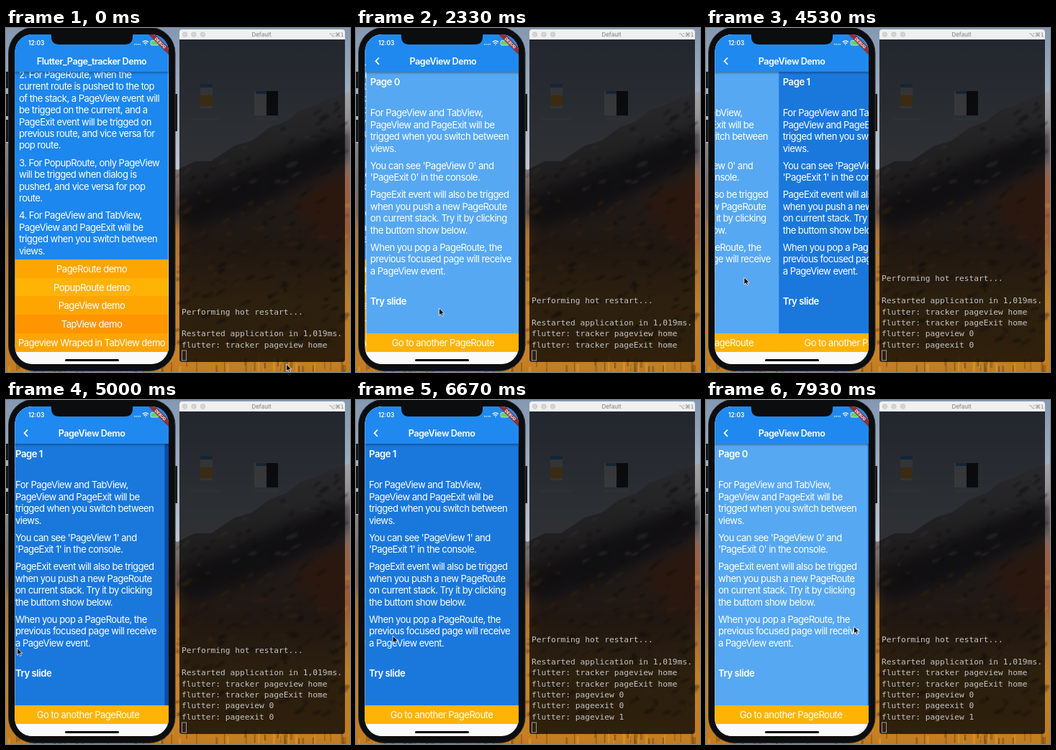
An HTML page for the animation above (8 s loop, 478 by 480 pixels).

```html
<!DOCTYPE html>
<html lang="en">
<head>
<meta charset="utf-8">
<title>Page tracker demo</title>
<style>
html, body { margin: 0; width: 100%; height: 100%; overflow: hidden; background: #000; }
svg { display: block; width: 478px; height: 480px; }
text { font: 13.1px Inter, "Liberation Sans", sans-serif; letter-spacing: -.55px; fill: #fff; white-space: pre; }
.mid { text-anchor: middle; }
.head { font-weight: 600; letter-spacing: -.45px; }
.title { font-size: 12.6px; font-weight: 600; letter-spacing: -.47px; text-anchor: middle; }
.clock { font-size: 8.4px; font-weight: 600; letter-spacing: 0; }
.debug { font-size: 5.6px; font-weight: bold; letter-spacing: 0; text-anchor: middle; }
.bar { font-size: 8px; letter-spacing: 0; fill: #7c7c7c; text-anchor: middle; }
.log { font: 11.22px "DejaVu Sans Mono", monospace; letter-spacing: 0; fill: #c4c4c4; }
</style>
</head>
<body>
<svg viewBox="0 0 478 480">
  <defs>
    <linearGradient id="sky" x2="0" y2="1">
      <stop offset="0" stop-color="#8498b2"/><stop offset=".4" stop-color="#bcc5d0"/>
    </linearGradient>
    <linearGradient id="rock" gradientUnits="userSpaceOnUse" y1="90" x2="0" y2="480">
      <stop offset="0" stop-color="#a2a2a8"/><stop offset=".3" stop-color="#77706e"/>
      <stop offset=".55" stop-color="#80583c"/><stop offset=".75" stop-color="#b07c2c"/>
      <stop offset="1" stop-color="#b87a20"/>
    </linearGradient>
    <linearGradient id="shade" x2="0" y2="1">
      <stop offset="0" stop-opacity=".3"/><stop offset="1" stop-opacity="0"/>
    </linearGradient>
    <filter id="soft" x="-50%" y="-50%" width="200%" height="200%"><feGaussianBlur stdDeviation="9"/></filter>
    <filter id="blur"><feGaussianBlur stdDeviation="1.2"/></filter>
    <clipPath id="screen"><rect x="12.500" y="9" width="213.500" height="460" rx="24"/></clipPath>
  </defs>

  <!-- wallpaper -->
  <path fill="url(#sky)" d="M0 0H478V480H0z"/>
  <path fill="url(#rock)" d="M0 160L60 175 150 150 238 198 262 186 285 186 318 164 342 157 366 139 390 130 408 115 430 108 446 99 461 95 478 88V480H0z"/>
  <g filter="url(#soft)">
    <path fill="#3c383a" d="M241 235L320 205 400 168 478 140V185L400 225 340 255 241 285z"/>
    <path fill="#a85a30" d="M395 240L478 195V310L430 290z"/>
    <path fill="#d0872a" d="M0 265L24 275V450H0zM226 275H243V460H226zM470 300H478V450H470z"/>
    <path fill="#c87f22" d="M0 455H478V480H0z"/>
  </g>
  <g id="land" filter="url(#blur)"></g>
  <g id="trees"></g>

  <!-- phone -->
  <path fill="#17181a" d="M0 61h5v23H0zM0 92h5v31H0zM0 128h5v31H0zM234 92h4v52h-4z"/>
  <rect x="3.500" y="-1" width="231.500" height="479.500" rx="36" fill="#0c0d0f" stroke="#2c2e32"/>
  <g clip-path="url(#screen)">
    <g id="home">
      <path fill="#fafafa" d="M12 8h214v462H12z"/>
      <path fill="#1c87ee" d="M12 8h214v316H12z"/>
    </g>
    <g id="demo">
      <path fill="#fafafa" d="M12 8h214v462H12z"/>
      <g id="pages"></g>
    </g>
    <text class="clock" x="31" y="23.500">12:03</text>
    <path fill="#fff" opacity=".75" d="M178 22h1.500v1.500h-1.500zM180.500 22h1.500v1.500h-1.500zM183 22h1.500v1.500h-1.500zM185.500 22h1.500v1.500h-1.500z"/>
    <path fill="none" stroke="#fff" stroke-width="1.300" d="M189.800 19.500q4-3.400 8 0M191.500 21.500q2.300-1.800 4.600 0M193.200 23.400h1.200"/>
    <rect x="201" y="17.500" width="11" height="6.500" rx="1.500" fill="#5fd36a" stroke="#d8e8f6" stroke-width=".8"/>
    <g transform="translate(226 8) rotate(45)">
      <path fill="#8c3038" d="M-26 13.800h52v6.800h-52z"/>
      <text class="debug" x="1" y="19.200">DEBUG</text>
    </g>
    <path fill="#0c0d0f" d="M60 8q3 0 3 3v1q0 11 11 11h91q11 0 11-11v-1q0-3 3-3z"/>
    <rect x="82" y="462" width="75" height="3" rx="1.500" fill="#000"/>
  </g>

  <!-- terminal -->
  <g opacity=".8">
    <path fill="#ddd" d="M270 78h17v34h-17z"/>
    <path fill="#2f8bea" d="M270 78h17v5h-17z"/><path fill="#ffb020" d="M270 94h17v15h-17z"/>
    <path fill="#eee" d="M345 88h17v34h-17z"/><path d="M362 88h16v34h-16z"/><path fill="#2f8bea" d="M347 88h15v4h-15z"/>
    <path fill="#dfe3e8" opacity=".3" d="M256 125h43v4h-43zM345 125h34v4h-34z"/>
  </g>
  <path opacity=".77" fill="#050506" d="M241 15H471V462q0 4-4 4H245q-4 0-4-4z"/>
  <path fill="#f0f0f0" d="M241 16V6q0-4 4-4H467q4 0 4 4V16z"/>
  <g fill="#d5d5d5" stroke="#bcbcbc" stroke-width=".6">
    <circle cx="248.500" cy="9" r="3.300"/><circle cx="261" cy="9" r="3.300"/><circle cx="273.500" cy="9" r="3.300"/>
  </g>
  <text class="bar" x="355" y="12">Default</text>
  <text class="bar" x="459" y="12" style="font-family:'DejaVu Sans',sans-serif;font-size:7.5px">⌥⌘1</text>
  <g id="log"></g>
  <rect x="244.500" y="450" width="6" height="14" fill="none" stroke="#9a9a9a"/>

  <path id="cursor" d="M0 0V10L2.400 7.800 4 11.300 5.700 10.500 4.200 7.200H7.200z" stroke="#fff" stroke-width=".8"/>
</svg>
<script>
const $ = id => document.getElementById(id);

function add(parent, tag, attrs, str = "") {
  const el = document.createElementNS("http://www.w3.org/2000/svg", tag);
  for (const k in attrs) el.setAttribute(k, attrs[k]);
  el.textContent = str;
  parent.append(el);
  return el;
}
const text = (g, x, y, str, cls = "") => add(g, "text", { x, y, class: cls }, str);
const rect = (g, x, y, width, height, fill) => add(g, "rect", { x, y, width, height, fill });
const move = (el, x, y = 0) => el.setAttribute("transform", `translate(${x} ${y})`);

const LINE = 16.4;
function para(g, y, str) {
  str.split("|").forEach((s, i) => text(g, 18, y + i * LINE, s));
}
function button(g, y, label, fill) {
  rect(g, 12.5, Math.round(y), 213.7, 26, fill);
  text(g, 119, y + 18, label, "mid");
}
function header(g, title) {
  rect(g, 12, 8, 214, 53, "#2089ef");
  rect(g, 12, 61, 214, 4, "url(#shade)");
  text(g, 119, 51, title, "title");
}

// home screen
const home = $("home"), demo = $("demo");
para(home, 70, "2. For PageRoute, when the|current route is pushed to the top|of the stack, a PageView event will|be trigged on the current, and a|PageExit event will be trigged on|previous route, and vice versa for|pop route.");
para(home, 193, "3. For PopupRoute, only PageView|will be trigged when dialog is|pushed, and vice versa for pop|route.");
para(home, 266.3, "4. For PageView and TabView,|PageView and PageExit will be|trigged when you switch between|views.");
["PageRoute", "PopupRoute", "PageView", "TapView", "Pageview Wraped in TabView"].forEach((s, i) =>
  button(home, 323 + i * 25.7, s + " demo", ["#ffa502", "#ffb304", "#ffa502", "#ff9500", "#ffa502"][i]));
header(home, "Flutter_Page_tracker Demo");

// swipeable pages
["#57a8f3", "#1a78dd", "#0e4aa2"].forEach((color, i) => {
  const g = add($("pages"), "g", {});
  move(g, i * 213);
  rect(g, 12.5, 61, 213.7, 366, color);
  text(g, 18, 80, "Page " + i, "head");
  para(g, 123.3, "For PageView and TabView,|PageView and PageExit will be|trigged when you switch between|views.");
  para(g, 197, `You can see 'PageView ${i}' and|'PageExit ${i}' in the console.`);
  para(g, 237.3, "PageExit event will also be trigged|when you push a new PageRoute|on current stack. Try it by clicking|the buttom show below.");
  para(g, 311, "When you pop a PageRoute, the|previous focused page will receive|a PageView event.");
  text(g, 18, 386, "Try slide", "head");
  button(g, 426, "Go to another PageRoute", "#ffb304");
});
header(demo, "PageView Demo");
add(demo, "path", { d: "M30 41.500l-4.500 4.700 4.500 4.700", fill: "none", stroke: "#fff", "stroke-width": 1.7 });

// scattered rocks and bushes, then forest along the bottom edge
let seed = 7;
const rnd = () => (seed = seed * 16807 % 2147483647) / 2147483647;
for (let i = 0; i < 260; i++) {
  const x = 238 + rnd() * 240, top = 205 - (x - 238) * .45, y = top + rnd() * (440 - top);
  const tones = y < 240 ? ["#2a282b", "#b4b2b4", "#4a4544"] : ["#3a2818", "#c08038", "#6a4424"];
  add($("land"), "ellipse", {
    rx: 2 + rnd() * 7, ry: 1 + rnd() * 2.5, fill: tones[i % 3], opacity: .5,
    transform: `translate(${x} ${y}) rotate(${-45 + rnd() * 40})`
  });
}
for (let i = 0; i < 90; i++)
  rect($("trees"), rnd() * 478, 455 + rnd() * 18, 1 + rnd() * 3, 8 + rnd() * 16,
    ["#e8a030", "#6b4214", "#c87820", "#53361a"][i % 4]).setAttribute("opacity", .45);

// console: [time shown, line]
const logs = [
  [0, "Performing hot restart..."], [0, ""],
  [0, "Restarted application in 1,019ms."],
  [0, "flutter: tracker pageview home"],
  [2000, "flutter: tracker pageExit home"],
  [2450, "flutter: pageview 0"],
  [4500, "flutter: pageexit 0"],
  [5400, "flutter: pageview 1"]
].map(([at, s], i) => ({ at, el: text($("log"), 244, 338 + i * 15.4, s, "log") }));

// linear track through [time, value...] points
function track(t, keys) {
  const n = keys.findIndex(k => k[0] > t);
  if (n === 0) return keys[0].slice(1);
  if (n < 0) return keys[keys.length - 1].slice(1);
  const a = keys[n - 1], b = keys[n], p = (t - a[0]) / (b[0] - a[0]);
  return a.slice(1).map((v, i) => v + (b[i + 1] - v) * p);
}
const pointer = [
  [0, 389.5, 469], [250, 372, 465], [1250, 150, 402], [1700, 115.5, 391],
  [3000, 115.5, 391], [3600, 174, 355], [3800, 180, 352], [4050, 178, 352],
  [4650, 22, 347], [4900, 15.5, 346], [5500, 15.5, 346], [6500, 50, 330],
  [6670, 51, 329], [7050, 95, 325], [7370, 205.5, 316]
];
const swipe = [
  [4050, 0], [4350, 70], [4650, 160], [4800, 206], [4900, 217], [5000, 218],
  [5200, 214.5], [5400, 213], [7130, 213], [7250, 195], [7400, 134]
];

function frame(now) {
  const t = now % 8000;
  move($("cursor"), ...track(t, pointer));

  const p = Math.min(1, Math.max(0, (t - 1950) / 480));
  const push = 1 - (1 - p) ** 3;
  move(home, -71 * push);
  move(demo, 213.5 * (1 - push));

  const off = t < 7400 ? track(t, swipe)[0] : 134 * Math.exp((7400 - t) / 108);
  move($("pages"), -off);

  const shown = logs.filter(l => l.at <= t).length;
  logs.forEach((l, i) => l.el.style.display = i < shown ? "" : "none");
  move($("log"), 0, (logs.length - shown) * 15.4);
  requestAnimationFrame(frame);
}
requestAnimationFrame(frame);
</script>
</body>
</html>
```
